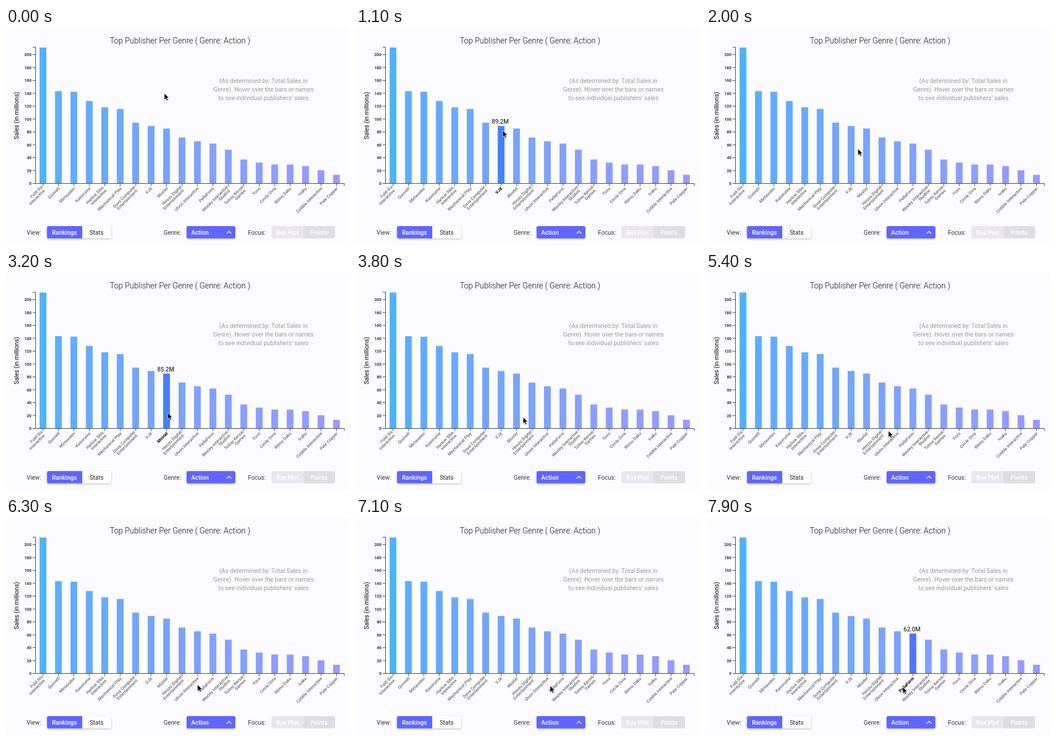
An HTML page that plays this animation: 600x379 px, repeating every 8 s.

```html
<!DOCTYPE html>
<html lang="en">
<head>
<meta charset="utf-8">
<title>Top Publisher Per Genre</title>
<style>
  html, body { margin: 0; width: 100%; height: 100%; overflow: hidden; background: #fcfbff; }
  svg { display: block; width: 600px; height: 379px; font: 10.5px Roboto, sans-serif; }
  .mid { text-anchor: middle; }
  .axis { fill: none; stroke: #444; }
  .tick { font-size: 7.3px; font-weight: 700; text-anchor: end; fill: #333; }
  .name { font-size: 7.5px; font-weight: 500; text-anchor: end; fill: #666; }
  .value { visibility: hidden; }
  .on .name { fill: #000; font-weight: 700; }
  .on .value { visibility: visible; }
  .hint { font-size: 10.6px; fill: #999; }
  .soft { filter: drop-shadow(0 1px 1.5px #0004); }
  .bold { font-weight: 500; fill: #fff; }
</style>
</head>
<body>
<svg viewBox="0 0 600 379">
  <text class="mid" x="303.5" y="27" font-size="13.8" font-weight="300" fill="#111">Top Publisher Per Genre ( Genre: Action )</text>
  <text class="mid" transform="translate(21.5 153) rotate(-90)">Sales (in millions)</text>
  <g class="mid hint">
    <text x="449" y="96">(As determined by: Total Sales in</text>
    <text x="449" y="111">Genre). Hover over the bars or names</text>
    <text x="449" y="126">to see individual publishers’ sales</text>
  </g>
  <g id="chart"></g>

  <g fill="#333">
    <text x="36" y="361">View:</text>
    <text x="275" y="361">Genre:</text>
    <text x="422" y="361">Focus:</text>
  </g>
  <g class="soft">
    <rect x="71.5" y="346" width="112" height="21.5" rx="3" fill="#fff"/>
    <path d="M133 346H74.5a3 3 0 0 0-3 3v15.5a3 3 0 0 0 3 3H133z" fill="#5f66ff"/>
  </g>
  <text class="mid bold" x="102" y="361">Rankings</text>
  <text class="mid" x="158" y="361" fill="#222">Stats</text>
  <rect class="soft" x="315" y="346" width="85" height="21.5" rx="3" fill="#5f66ff"/>
  <text class="bold" x="323" y="361">Action</text>
  <path d="M385 359l4-4 4 4" fill="none" stroke="#fff" stroke-width="1.3"/>
  <path d="M519 346h-53a3 3 0 0 0-3 3v15.5a3 3 0 0 0 3 3h53z" fill="#e9e7ed"/>
  <path d="M519 346h52a3 3 0 0 1 3 3v15.5a3 3 0 0 1-3 3h-52z" fill="#dfdde4"/>
  <g class="mid bold">
    <text x="491" y="361">Box Plot</text>
    <text x="546" y="361">Points</text>
  </g>
  <path id="cursor" class="soft" d="M0 0V11.5L2.7 9 4.6 13 6.5 12.1 4.7 8.2H8.3Z" stroke="#fff" stroke-width=".8"/>
</svg>
<script>
const names = ['Fold-Six|Interactive', 'Quovelt', 'Mirtavolen', 'Kasorume', 'Harlow Sibs.|Interactive',
  'Mechanical Play', 'Dova Computer|Entertainment', 'VJX', 'Moxtel', 'Hirozu Digital|Entertainment',
  'Ulvon Interactive', 'PellaForm', 'Wexley Interactive|Studios', 'Tolmo Kersai|Games', 'Yuvo',
  'Circle Ovra', 'Rilmo Daku', 'Ivaku', 'Cobble Interactive', 'Pale Copper'];
const sales = [211, 143.3, 142.4, 128, 118.2, 115.6, 94.4, 89.2, 85.2, 71.3,
  65.5, 62, 52.4, 37.2, 32.4, 29.4, 29.3, 26.9, 20.5, 13.4];
// time, x, y of the pointer tip
const path = [[0, 276, 114], [1100, 256, 179], [2000, 265, 211], [3200, 282, 244],
  [4600, 304, 262], [6300, 334, 291], [7900, 343, 295]];
const BASE = 271.5, BAR = 11.8;
const barX = i => 64.5 + i * 26.94;
const barY = v => BASE - v * 1.125;
const mix = (a, b, k) => a + (b - a) * k;
const blend = (a, b, k) => `rgb(${a.map((v, i) => Math.round(mix(v, b[i], k)))})`;
const barColor = i => blend([78, 178, 255], [153, 153, 255], Math.sqrt(i / 19) * .6 + i / 19 * .4);
const hotColor = i => blend([66, 132, 255], [84, 112, 255], Math.max(0, (i - 7) / 5));

let axes = `<path class="axis" d="M46.5 33.5H51.5V${BASE}H590V276`;
let marks = '';
for (let v = 0; v <= 200; v += 20) {
  axes += `M46.5 ${barY(v)}h5`;
  marks += `<text class="tick" x="44.5" y="${barY(v) + 2.7}">${v}</text>`;
}
names.forEach((_, i) => axes += `M${barX(i)} ${BASE}v4.5`);

const bars = names.map((name, i) => {
  const lines = name.split('|'), x = barX(i), y = barY(sales[i]);
  const label = lines.map((s, n) => {
    const shift = lines.length > 1 ? -3.8 + n * 7.2 : 0;
    return `<text class="name" y="${shift + 2.5}"${n ? ' x="-2"' : ''}>${s}</text>`;
  }).join('');
  return `<g class="item"><rect x="${x - BAR / 2}" y="${y}" width="${BAR}" height="${BASE - y}"/>
    <text class="value mid" x="${x - 1.5}" y="${y - 4}">${sales[i].toFixed(1)}M</text>
    <g transform="translate(${x + 1} 279) rotate(-45)">${label}</g></g>`;
});
document.getElementById('chart').innerHTML = bars.join('') + axes + '"/>' + marks;

const items = [...document.querySelectorAll('.item')];
const cursor = document.getElementById('cursor');

function pointer(t) {
  const n = Math.max(1, path.findIndex(p => p[0] >= t));
  const [a, b] = [path[n - 1], path[n]];
  const k = (t - a[0]) / (b[0] - a[0]);
  return [mix(a[1], b[1], k), mix(a[2], b[2], k)];
}

function isOver(i, x, y) {
  const onBar = Math.abs(x - barX(i)) <= BAR / 2 && y >= barY(sales[i]) && y <= BASE;
  const dx = x - barX(i) - 1, dy = y - 279;
  const along = (dy - dx) / Math.SQRT2, across = (dx + dy) / Math.SQRT2;
  return onBar || along > 0 && along < names[i].length * 3.8 && Math.abs(across) < 5;
}

function draw(now) {
  const [x, y] = pointer(Math.floor(now % 8000 / 100) * 100);
  cursor.setAttribute('transform', `translate(${x} ${y})`);
  items.forEach((item, i) => {
    const on = isOver(i, x, y);
    item.classList.toggle('on', on);
    item.firstChild.setAttribute('fill', on ? hotColor(i) : barColor(i));
  });
  requestAnimationFrame(draw);
}
draw(performance.now());
</script>
</body>
</html>
```
